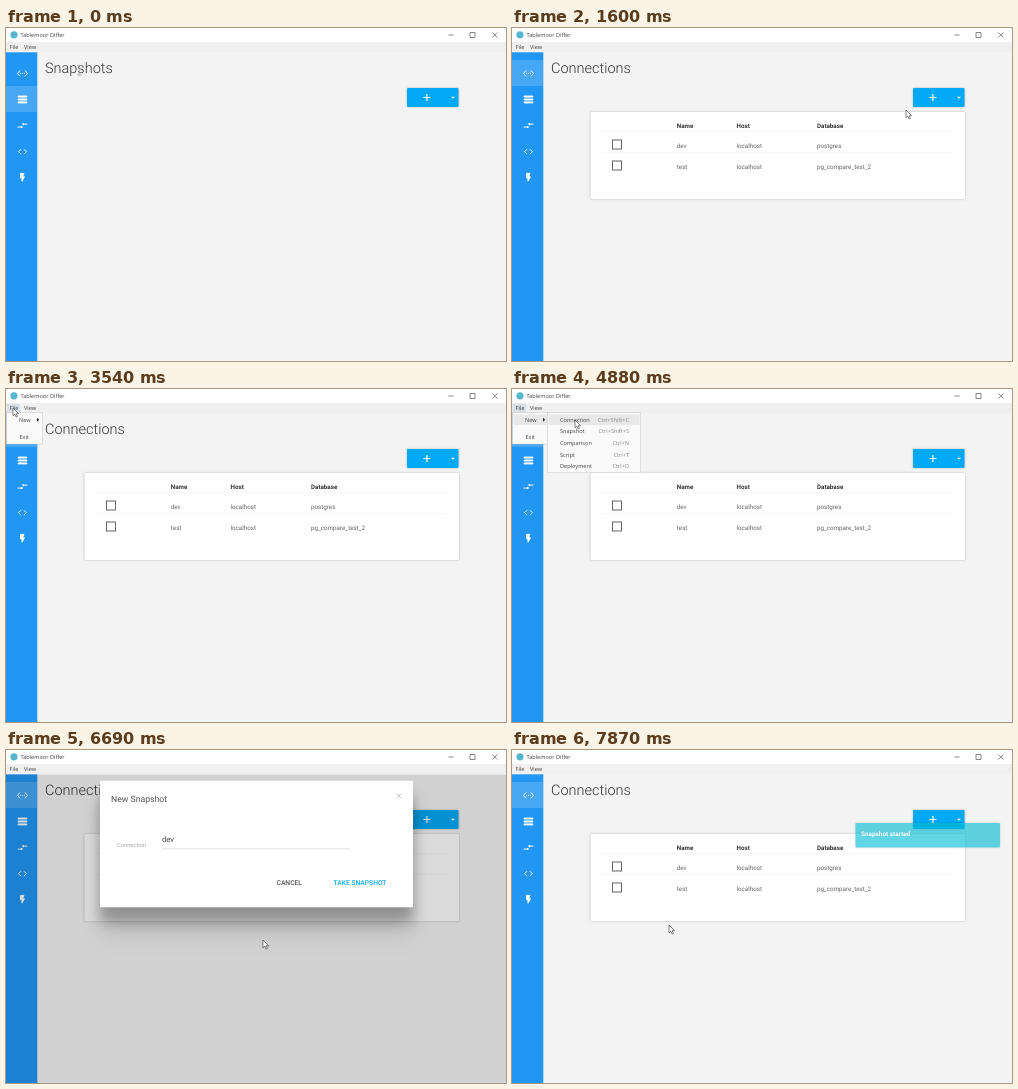
Write an HTML page that moves like this. It is 500 by 333 pixels and loops after 7990 ms.

```html
<!DOCTYPE html>
<html lang="en">
<head>
<meta charset="utf-8">
<title>Snapshot demo</title>
<style>
html, body { margin: 0; width: 100%; height: 100%; overflow: hidden; background: #f3f3f3; }
svg { display: block; width: 500px; height: 333px; font: 6.24px Roboto, sans-serif; fill: #666; }
text { text-rendering: geometricPrecision; }
.native { font: 5.6px "Open Sans", sans-serif; fill: #444; }
.title { font-size: 14.5px; font-weight: 300; fill: #333; }
.head { font-weight: 700; fill: #333; }
.button { font-size: 6.72px; font-weight: 500; }
.raised { filter: drop-shadow(0 .8px .8px rgba(0,0,0,.25)); }
.box { fill: #fff; stroke: #555; stroke-width: .9; }
.line { fill: none; stroke: #555; stroke-width: .7; }
.menu { fill: #fafafa; stroke: #ccc; stroke-width: .5; filter: drop-shadow(.6px .6px .5px rgba(0,0,0,.12)); }
.hover { fill: #e8e8e8; }
.sheet { fill: #fff; filter: drop-shadow(0 19px 9px rgba(0,0,0,.18)) drop-shadow(0 13px 6px rgba(0,0,0,.2)); }
</style>
</head>
<body>
<svg viewBox="0 0 500 333">
  <rect width="500" height="333" fill="#f3f3f3"/>

  <!-- pages -->
  <text id="snapTitle" class="title" x="39" y="44.5">Snapshots</text>
  <text id="connTitle" class="title" x="39" y="44.5">Connections</text>
  <g id="table">
    <rect class="raised" x="78.5" y="84" width="374.5" height="87" rx="1" fill="#fff"/>
    <path d="M89 103.5H441M89 124.5H441" stroke="#f5f5f5" stroke-width=".7"/>
  </g>
  <rect class="raised" x="401" y="60" width="51.5" height="19" rx="1" fill="#03a9f4"/>
  <path d="M417.4 69.5h7M420.9 66v7" stroke="#fff" stroke-width="1.2"/>
  <path d="M445 68.7h4l-2 2z" fill="#fff"/>

  <!-- sidebar -->
  <rect y="24" width="31.3" height="309" fill="#2196f3"/>
  <rect id="active" width="31.3" height="26" fill="#fff" opacity=".17"/>
  <g id="icons" stroke="#fff" stroke-width="2"></g>

  <rect id="shade" y="24.5" width="500" height="309" fill="#000"/>

  <!-- dialog -->
  <g id="dialog">
    <rect class="sheet" x="94" y="29" width="313" height="126.5" rx="1"/>
    <text x="105" y="49.8" style="font-size:8.7px" fill="#555">New Snapshot</text>
    <path d="M391 42l4 4m0-4l-4 4" stroke="#aaa" stroke-width=".8"/>
    <text x="111" y="95" style="font-size:5.76px" fill="#aaa">Connection</text>
    <text x="156" y="90.3" style="font-size:7.7px" fill="#444">dev</text>
    <path d="M156 97H344" stroke="#d4d4d4" stroke-width=".7"/>
    <rect id="press" x="313.5" y="122.5" width="81.5" height="16.5" rx="1" fill="#999"/>
    <text class="button" x="270.5" y="132.8" fill="#555">CANCEL</text>
    <text class="button" x="354" y="132.8" text-anchor="middle" fill="#03a9f4">TAKE SNAPSHOT</text>
  </g>

  <g id="toast">
    <rect class="raised" x="343.5" y="73" width="144.5" height="24.5" rx="1" fill="#00bcd4"/>
    <text x="349" y="86.3" style="font-size:6.4px;font-weight:700" fill="#fff">Snapshot started</text>
  </g>

  <!-- window frame and menus -->
  <g class="native">
    <rect width="500" height="14" fill="#fff"/>
    <rect y="14" width="500" height="10.3" fill="#f0f0f0"/>
    <circle cx="8" cy="6.8" r="3.6" fill="#56b5cf"/>
    <text x="14.5" y="8.9">Tablemoor Differ</text>
    <path class="line" d="M442.5 7h5M464 4.5h5v5h-5zM486.3 4.5l5 5m0-5l-5 5"/>
    <rect id="fileHover" x=".5" y="14.8" width="13.5" height="8.4" fill="#d9dfe4"/>
    <text x="3.5" y="21">File</text><text x="18" y="21">View</text>
    <g id="fileMenu">
      <rect class="menu" x=".3" y="23.5" width="36.2" height="31.5"/>
      <rect id="newHover" class="hover" x="1.5" y="25.5" width="34" height="10.5"/>
      <text x="13" y="32.6">New</text><text x="13.5" y="50">Exit</text>
      <path d="M31 28.8v4l2.2-2z" fill="#222"/>
    </g>
    <g id="subMenu">
      <rect class="menu" x="35.5" y="23.7" width="93" height="60"/>
      <rect id="itemHover" class="hover" x="37" width="90.5" height="10.5"/>
    </g>
  </g>

  <path id="ibeam" d="M71 37.5h4.4M73.2 37.5V47M71 47h4.4" fill="none" stroke="#999" stroke-width=".7"/>
  <path id="arrow" d="M0 0v7.8l1.8-1.7 1.3 2.9 1.3-.6-1.2-2.7h2.4z" fill="#fff" stroke="#333" stroke-width=".6"/>
</svg>
<script>
const LOOP = 7990, MOVE = 250;
const $ = id => document.getElementById(id);
const show = (id, on) => $(id).setAttribute('opacity', +on);
const move = (id, x, y) => $(id).setAttribute('transform', `translate(${x} ${y})`);

// Eased 0 to 1 between two times
function ramp(t, from, to) {
  const p = Math.min(1, Math.max(0, (t - from) / (to - from)));
  return p * p * (3 - 2 * p);
}

const icons = [
  'M7 6l-5 6 5 6M17 6l5 6-5 6M7 12h2m2 0h2m2 0h2',
  'M3 5h18v2H3zm0 6h18v2H3zm0 6h18v2H3z',
  'M2 15h8m0-2l2 2-2 2zM22 9h-8m0-2l-2 2 2 2z',
  'M9 7l-5 5 5 5M15 7l5 5-5 5',
  'M8 3v9h3v7l5-9h-4l3-7z'
];
$('icons').innerHTML = icons.map((d, i) =>
  `<path d="${d}" fill="${d.endsWith('z') ? '#fff' : 'none'}" transform="translate(10.6 ${39.5 + 26.1 * i}) scale(.49)"/>`).join('');

const rows = [['Name', 'Host', 'Database'], ['dev', 'localhost', 'postgres'], ['test', 'localhost', 'pg_compare_test_2']];
$('table').innerHTML += rows.map((row, i) => {
  const y = 99.6 + 20.8 * i;
  const cells = row.map((s, j) => `<text x="${[164.8, 224.5, 305][j]}" y="${y}">${s}</text>`).join('');
  return i ? `<rect class="box" x="100.5" y="${91 + 21 * i}" width="9" height="9"/>${cells}` : `<g class="head">${cells}</g>`;
}).join('');

const items = [['Connection', 'Shift+C'], ['Snapshot', 'Shift+S'], ['Comparison', 'N'], ['Script', 'T'], ['Deployment', 'D']];
$('subMenu').innerHTML += items.map(([name, key], i) => {
  const y = 32.8 + 11.6 * i;
  return `<text x="48" y="${y}">${name}</text><text x="117" y="${y}" text-anchor="end" fill="#888">Ctrl+${key}</text>`;
}).join('');

// Pointer stops: arrival time and place
const stops = [[550, 15, 45], [1600, 394, 82], [2020, 113, 101], [3200, 7, 19], [3900, 17, 30],
  [4700, 63, 31], [5150, 62, 38], [6150, 257, 190], [7000, 350, 135], [7600, 172, 169], [7870, 157, 175]];
const pointer = t => stops.reduce(([x, y], [end, nx, ny]) => {
  const p = ramp(t, end - MOVE, end);
  return [x + (nx - x) * p, y + (ny - y) * p];
}, [73, 38]);

function draw(t) {
  const connections = t > 660, menu = t >= 3540 && t < 5300;
  show('snapTitle', !connections);
  show('connTitle', connections);
  show('table', ramp(t, 660, 1000));
  move('active', 0, connections ? 32 : 58);

  show('fileHover', menu);
  show('fileMenu', menu);
  show('newHover', menu && t > 3790);
  show('subMenu', menu && t >= 4320);
  show('itemHover', t > 4600);
  move('itemHover', 0, t > 5020 ? 37.2 : 25.6);

  const enter = ramp(t, 5440, 5780), open = enter - ramp(t, 7520, 7740);
  show('shade', .14 * open);
  show('dialog', open);
  move('dialog', 0, 1.8 - 22 * (1 - enter));
  show('press', t > 7000 ? .17 : 0);
  show('toast', .62 * ramp(t, 7700, 7870));

  show('ibeam', t < 150);
  show('arrow', t >= 150);
  move('arrow', ...pointer(t));
}

function frame() {
  draw(performance.now() % LOOP);
  requestAnimationFrame(frame);
}
frame();
</script>
</body>
</html>
```
